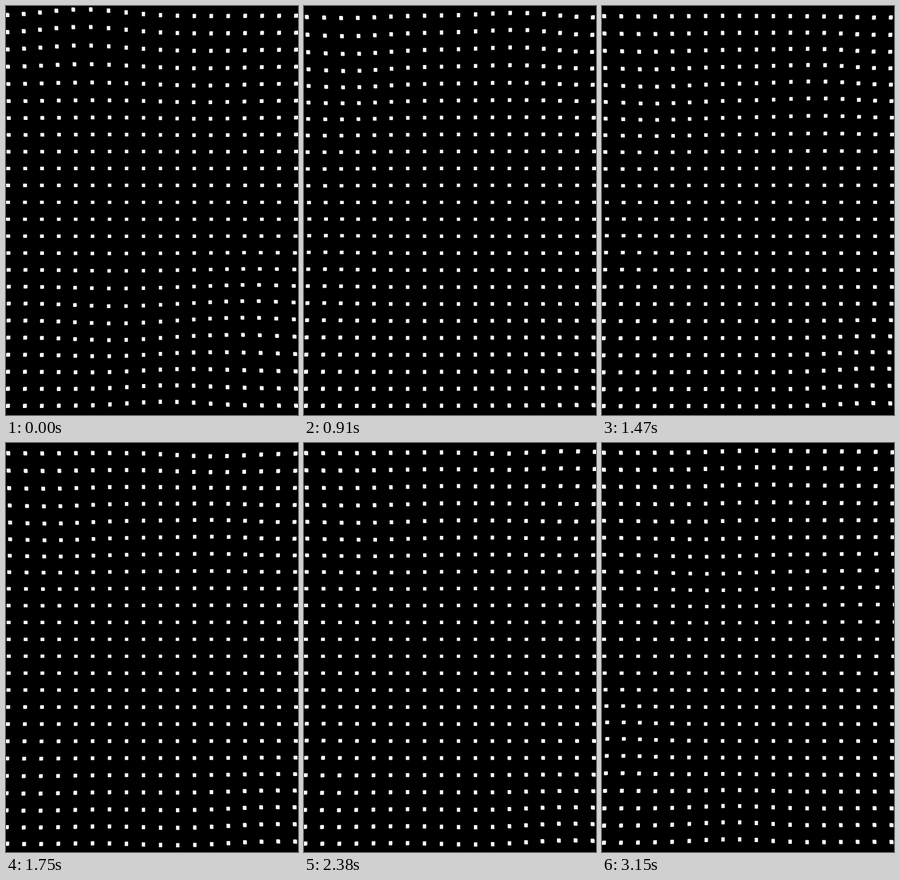
An HTML page with a canvas for the animation above (3.22 s loop, 500x700 px).

```html
<!DOCTYPE html>
<html lang="en">
<head>
<meta charset="utf-8">
<title>Drifting boxes</title>
<style>
  html, body { margin: 0; width: 100%; height: 100%; overflow: hidden; background: #000; }
  canvas { display: block; width: 500px; height: 700px; }
</style>
</head>
<body>
<canvas id="stage" width="500" height="700"></canvas>
<script>
const LOOP = 3220, STEP = 70;
const COLS = 18, ROWS = 24, GAP = 29.2;
const CX = 250, CY = 350.5;
const BOX = 5.6, DEPTH = 0.005;

// The sheet of boxes rests a little behind the picture plane.
// Swells rise towards the viewer (+) or sink away (-), then fade.
const REST = -6, REACH = 2.2, LIFE = 300;
const swells = [
  // time, column, row, height in thousandths of the viewing distance
  [0, 6.5, 17.5, 24],
  [0, 14.7, 16.8, -29],
  [0, 9, 23, -20],
  [200, 4.5, 0.5, 42],
  [230, 11.5, 4.7, -22],
  [300, 11.7, 19.3, -20],
  [490, 0.5, 6, -24],
  [490, 0.5, 16.5, -25],
  [910, 2.5, 2.7, -27],
  [910, 13, 1, 20],
  [1150, 16.2, 2, -26],
  [1190, 0.7, 12, -36],
  [1400, 16, 21, -22],
  [1470, 3, 5.5, -22],
  [1470, 13, 5, 23],
  [2030, 12, -0.5, -30],
  [2030, 1.5, 4, -20],
  [2030, 15.5, 5, -24],
  [2030, 1.5, 20.5, 18],
  [2030, 10, 23, 19],
  [2660, 14.2, 0.5, 24],
  [2660, 15.5, 22.5, -20],
  [2700, 4.3, 5.8, -26],
  [2850, 9, 1.5, 22],
  [2900, 0.5, 16.7, -34],
  [2900, 16, 9.2, 30],
  [3150, 6.5, 8, -28],
  [3150, 7.5, 22, -20]
];

const bell = d => Math.exp(-d * d / 2);

function height(col, row, time) {
  let sum = REST;
  for (const [t, c, r, h] of swells) {
    sum += h * bell((time - t) / LIFE) * bell((col - c) / REACH) * bell((row - r) / REACH);
  }
  return sum / 1000;
}

const ctx = document.getElementById("stage").getContext("2d");

// Outline of a box seen in perspective: its far and near faces joined.
function drawBox(x, y) {
  const h = BOX / 2, sx = x < 0 ? -h : h, sy = y < 0 ? -h : h;
  const near = 1 + DEPTH / 2, far = 1 - DEPTH / 2;
  const corner = (k, dx, dy) => ctx.lineTo(CX + x * k + dx, CY + y * k + dy);
  ctx.beginPath();
  corner(far, -sx, -sy);
  corner(far, sx, -sy);
  corner(near, sx, -sy);
  corner(near, sx, sy);
  corner(near, -sx, sy);
  corner(far, -sx, sy);
  ctx.fill();
}

function draw(time) {
  ctx.fillStyle = "#000";
  ctx.fillRect(0, 0, 500, 700);
  ctx.fillStyle = "#f8f8f8";
  for (let row = -1; row <= ROWS; row++) {
    for (let col = -1; col <= COLS; col++) {
      const scale = GAP * (1 + height(col, row, time));
      drawBox((col - (COLS - 1) / 2) * scale, (row - (ROWS - 1) / 2) * scale);
    }
  }
}

const start = performance.now();
let shown = -1;
function tick() {
  const step = Math.floor((performance.now() - start) % LOOP / STEP);
  if (step !== shown) draw((shown = step) * STEP);
  requestAnimationFrame(tick);
}
tick();
</script>
</body>
</html>
```
